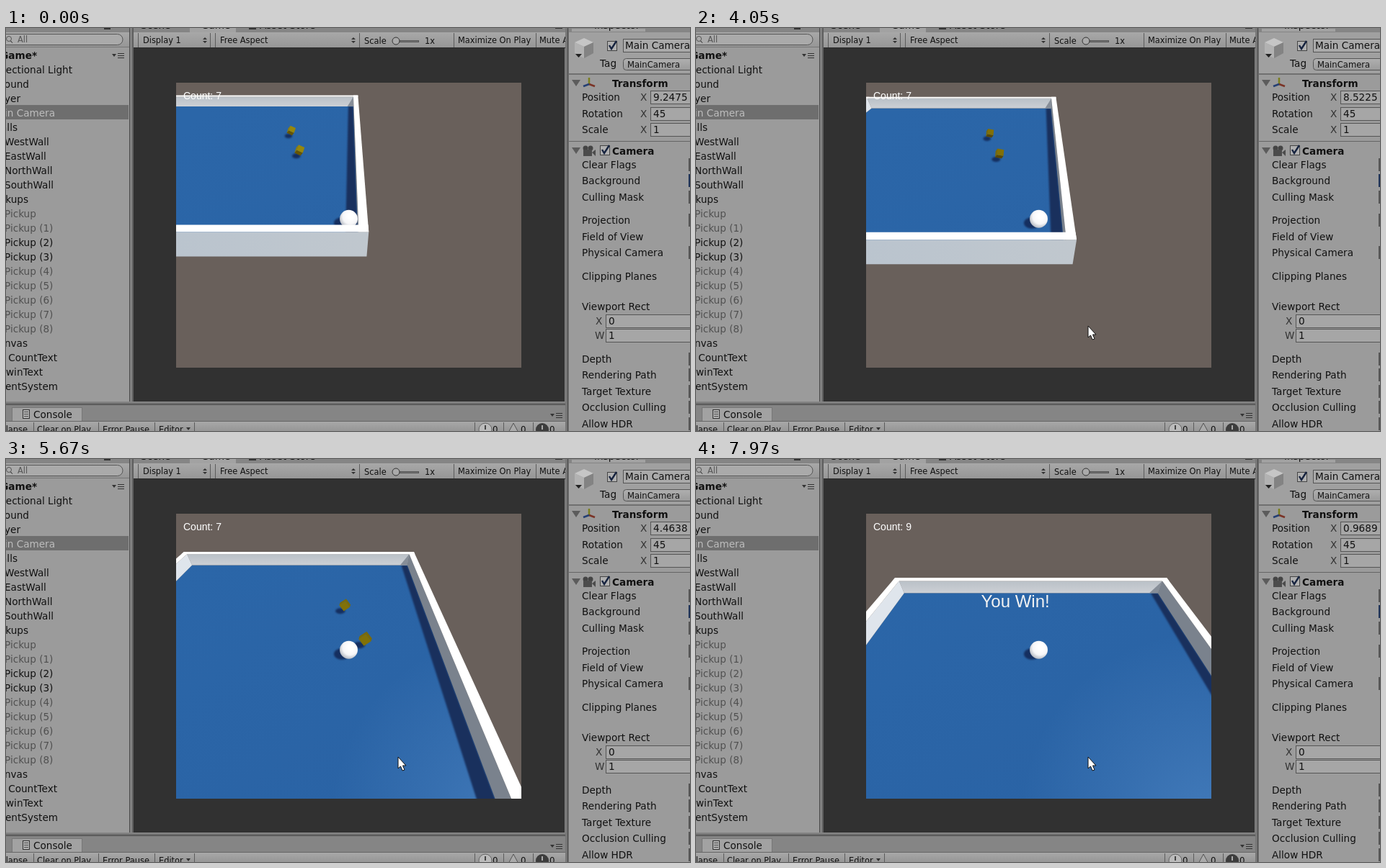
These frames come from a looping animation (949 px wide and 560 px high, 8 s). An HTML page with a canvas:

```html
<!DOCTYPE html>
<html>
<head>
<meta charset="utf-8">
<style>
html, body { margin: 0; width: 100%; height: 100%; overflow: hidden; background: #9b9b9b; }
canvas { display: block; }
</style>
</head>
<body>
<canvas id="stage" width="949" height="560"></canvas>
<script>
const ctx = document.getElementById('stage').getContext('2d');
const UI = '"DejaVu Sans", sans-serif', ARIAL = '"Liberation Sans", Arial, sans-serif';
const LOOP = 8, FIRST_PICK = 5.82, SECOND_PICK = 6.81;

// Motion keys: [seconds, value, speed]
const ballX = [[0, 9.2475, 0], [1.89, 9.2463, 0], [3.25, 9.246, 0], [4.05, 8.41, -2],
  [5.05, 4.683, -2.5], [5.67, 4.44, .3], [6.82, 4.728, -1.6], [7.97, .598, -4.5], [8, .46, -4.5]];
const shownX = [[0, 9.2475, 0], [1.89, 9.2463, 0], [3.3, 9.246, 0], [4.05, 8.5245, -2],
  [5.05, 4.9315, -2.8], [5.67, 4.4638, 0], [6.82, 4.8975, -1.5], [7.97, .9734, -4.5], [8, .84, -4.5]];
const cameraZ = [[0, -18.77, .13], [1.89, -18.53, .13], [3.7, -18.34, .1], [4.05, -18.25, .6],
  [4.21, -18.02, 2], [5.05, -14.58, 4.7], [5.67, -11.93, 3.9], [6.82, -7.95, 2], [7.97, -7.135, .1], [8, -7.13, .1]];

function track(keys, t) {
  let i = 0;
  while (i < keys.length - 2 && t >= keys[i + 1][0]) i++;
  const [t0, a, va] = keys[i], [t1, b, vb] = keys[i + 1];
  const d = t1 - t0, u = (t - t0) / d, w = 1 - u;
  return a * w * w * (1 + 2 * u) + b * u * u * (3 - 2 * u) + d * u * w * (va * w - vb * u);
}

function rect(x, y, w, h, fill, stroke) {
  ctx.fillStyle = fill;
  ctx.fillRect(x, y, w, h);
  if (stroke) {
    ctx.strokeStyle = stroke;
    ctx.lineWidth = 1;
    ctx.strokeRect(x + .5, y + .5, w - 1, h - 1);
  }
}
function text(s, x, y, { size = 13.6, color = '#111', bold, align = 'left', font = UI } = {}) {
  ctx.font = `${bold ? 'bold ' : ''}${size}px ${font}`;
  ctx.fillStyle = color;
  ctx.textAlign = align;
  ctx.fillText(s, x, y);
}
function poly(points, fill, stroke) {
  ctx.beginPath();
  points.forEach(p => ctx.lineTo(p[0], p[1]));
  ctx.closePath();
  ctx.fillStyle = fill;
  ctx.fill();
  if (stroke) { ctx.strokeStyle = stroke; ctx.lineWidth = 1; ctx.stroke(); }
}
function ellipse(x, y, rx, ry, fill, stroke) {
  ctx.beginPath();
  ctx.ellipse(x, y, rx, ry, 0, 0, 7);
  ctx.fillStyle = fill;
  ctx.fill();
  if (stroke) { ctx.strokeStyle = stroke; ctx.lineWidth = 1; ctx.stroke(); }
}
function gradient(x0, y0, x1, y1, from, to) {
  const g = ctx.createLinearGradient(x0, y0, x1, y1);
  g.addColorStop(0, from);
  g.addColorStop(1, to);
  return g;
}
const bar = (x, y, w, h) => rect(x, y, w, h, gradient(0, y, 0, y + h, '#a8a8a8', '#969696'));

// ---------- 3D view: camera 10 up, pitched 45 degrees, 60 degree lens ----------
let cam;
function project(x, y, z) {
  const dy = y - 10, dz = z - cam.z, scale = 343 / ((dz - dy) * Math.SQRT1_2);
  return [475.5 + (x - cam.x) * scale, 274 - (dz + dy) * Math.SQRT1_2 * scale, scale];
}
const face = (fill, ...corners) => poly(corners.map(c => project(...c)), fill);
const flat = (fill, y, x0, x1, z0, z1) => face(fill, [x0, y, z0], [x1, y, z0], [x1, y, z1], [x0, y, z1]);

function shadow(x, z, rx, ry) {
  const [sx, sy, s] = project(x, 0, z);
  ctx.filter = 'blur(1px)';
  ellipse(sx, sy, rx * s, ry * s, 'rgba(18,38,84,.85)');
  ctx.filter = 'none';
}

function cube(x, z, t) {
  shadow(x - .33, z, .34, .2);
  const [cx, cy, s] = project(x, .5, z), half = s * .26;
  const phase = (t - 1.89) / 3.16, turn = phase * 2 * Math.PI;
  const yaw = .15 - .15 * Math.cos(turn / 2), pitch = .6 * Math.sin(turn / 2) ** 2, roll = turn * .75;
  const light = .5 + .5 * Math.max(0, Math.cos(turn)) ** 4 + .2 * Math.max(0, -Math.cos(turn)) ** 4;
  const spin = (a, b, r) => [a * Math.cos(r) - b * Math.sin(r), a * Math.sin(r) + b * Math.cos(r)];
  const rotate = ([px, py, pz]) => {
    [px, pz] = spin(px, pz, yaw);
    [py, pz] = spin(py, pz, -pitch);
    [px, py] = spin(px, py, roll);
    return [px, py, pz];
  };
  for (let axis = 0; axis < 3; axis++) for (const side of [-1, 1]) {
    const normal = [0, 0, 0];
    normal[axis] = side;
    const n = rotate(normal);
    if (n[2] <= .02) continue;
    const b = Math.min(1, light * (n[2] > .7 ? 1 : n[1] < 0 ? .95 : .68));
    const corners = [[-1, -1], [1, -1], [1, 1], [-1, 1]].map(([u, v]) => {
      const p = [0, 0, 0];
      p[axis] = side; p[(axis + 1) % 3] = u; p[(axis + 2) % 3] = v;
      const r = rotate(p);
      return [cx + r[0] * half, cy + r[1] * half];
    });
    poly(corners, `rgb(${255 * b},${255 * b ** 1.2},${60 * b ** 3})`);
  }
}

function game(t) {
  rect(177, 28, 598, 491, '#313131');
  ctx.save();
  ctx.beginPath();
  ctx.rect(236, 76, 479, 396);
  ctx.clip();
  rect(236, 76, 479, 396, '#69605b');
  cam = { x: track(ballX, t), z: track(cameraZ, t) };
  const ballZ = cam.z + 10, I = 9.75, O = 10.25;

  flat(gradient(300, 100, 560, 480, '#2b66a8', '#2a63a5'), 0, -I, I, -I, I);
  const sheen = ctx.createRadialGradient(710, 500, 0, 710, 500, 260);
  sheen.addColorStop(0, 'rgba(100,155,215,.4)');
  sheen.addColorStop(1, 'rgba(100,155,215,0)');
  flat(sheen, 0, -I, I, -I, I);
  ctx.filter = 'blur(1px)';
  face('#19305d', [9.07, 0, -I], [I, 0, -I], [I, 0, I], [9.2, 0, I]);
  ctx.filter = 'none';

  const top = project(0, 1, I)[1], foot = project(0, 0, I)[1];
  face(gradient(0, top, 0, foot, '#b9c0c7', '#cdd0d5'), [-I, 1, I], [I, 1, I], [I, 0, I], [-I, 0, I]);
  face('#878e98', [9.1, 0, I], [I, 1, I], [I, 0, I]);
  face('#dfe5ec', [-I, 1, I], [-I, 0, I], [-I, 0, -I], [-I, 1, -I]);
  face('#7a828d', [I, 1, I], [I, 0, I], [I, 0, -I], [I, 1, -I]);
  flat('#fff', 1, -O, O, I, O);
  flat('#fff', 1, -O, -I, -O, O);
  flat('#fff', 1, I, O, -O, O);

  if (t < SECOND_PICK) cube(4.18, 2.55, t);
  if (t < FIRST_PICK) cube(5.41, -.98, t);

  shadow(cam.x - .4, ballZ + .18, .46, .32);
  const [bx, by, s] = project(cam.x, .5, ballZ);
  const shine = ctx.createRadialGradient(bx + 3, by - 4, 4, bx + 2, by - 3, 16);
  shine.addColorStop(0, '#fff');
  shine.addColorStop(.55, '#f6f6f8');
  shine.addColorStop(1, '#b4b9c2');
  ellipse(bx, by, s / 2, s / 2, shine);

  flat('#fff', 1, -O, O, -O, -I);
  face(gradient(236, 0, 650, 0, '#bac4ce', '#c3c9ce'), [-O, 1, -O], [O, 1, -O], [O, -1, -O], [-O, -1, -O]);

  const count = t < FIRST_PICK ? 7 : t < SECOND_PICK ? 8 : 9;
  text('Count: ' + count, 246, 99, { size: 14, color: '#fff', font: ARIAL });
  if (count === 9) text('You Win!', 395.5, 206, { size: 24, color: '#f2f2f2', font: ARIAL });
  ctx.restore();
}

// ---------- Editor panels ----------
function menuIcon(x, y) {
  poly([[x, y - 2], [x + 6, y - 2], [x + 3, y + 2]], '#333');
  for (let i = 0; i < 3; i++) rect(x + 8, y - 3 + i * 3, 9, 1, '#333');
}
function updown(x, y) {
  poly([[x, y - 1], [x + 6, y - 1], [x + 3, y - 4]], '#333');
  poly([[x, y + 1], [x + 6, y + 1], [x + 3, y + 4]], '#333');
}
function checkbox(x, y) {
  rect(x, y, 14, 14, '#b0b0b0', '#444');
  ctx.strokeStyle = '#16233f';
  ctx.lineWidth = 2.4;
  ctx.beginPath();
  ctx.moveTo(x + 3, y + 6);
  ctx.lineTo(x + 6, y + 11);
  ctx.lineTo(x + 13, y);
  ctx.stroke();
}
const fold = (x, y) => poly([[x, y], [x + 12, y], [x + 6, y + 9]], '#5c5c5c');

// Label and the x where it ends; without one it is an indented child.
const rows = [['Directional Light', 92], ['Ground', 32], ['Player', 20], ['Main Camera', 68], ['Walls', 16],
  ['WestWall'], ['EastWall'], ['NorthWall'], ['SouthWall'], ['Pickups', 31], ['Pickup'],
  ...Array.from({ length: 8 }, (_, i) => [`Pickup (${i + 1})`]),
  ['Canvas', 30], ['CountText', 71], ['winText', 51], ['EventSystem', 72]];

function hierarchy(t) {
  rect(0, 0, 171, 521, '#9b9b9b');
  rect(0, 0, 171, 6, '#858585');
  rect(136, 0, 9, 2, '#333');
  bar(0, 6, 171, 20);
  ctx.beginPath();
  ctx.roundRect(-12, 8.5, 174, 15, 8);
  ctx.fillStyle = '#aaa';
  ctx.fill();
  ctx.strokeStyle = '#555';
  ctx.lineWidth = 1;
  ctx.stroke();
  ellipse(4, 15, 3.5, 3.5, '#aaa', '#555');
  poly([[6, 18], [9, 21], [7, 18]], '#555', '#555');
  text('All', 16, 20, { size: 11.4, color: '#555' });
  rect(0, 26, 171, 1, '#777');
  text('Game*', 43, 43, { bold: true, align: 'right' });
  menuIcon(147, 38);
  rect(0, 107, 170, 20, '#6e6e6e');
  rows.forEach(([label, end], i) => {
    const gone = label.startsWith('Pickup') && label !== 'Pickups' &&
      !(label === 'Pickup (2)' && t < SECOND_PICK) && !(label === 'Pickup (3)' && t < 5.96);
    const color = i === 3 ? '#bdbdbd' : gone ? '#505050' : '#111';
    text(label, end ?? -2, 63 + i * 20, { color, align: end ? 'right' : 'left' });
  });
  rect(171, 0, 1, 521, '#4a4a4a');
}

function gameToolbar() {
  rect(175, 0, 602, 6, '#858585');
  rect(255, 0, 64, 6, '#a2a2a2');
  text('Scene', 187, 1);
  text('Game', 271, 1);
  text('Asset Store', 352, 1);
  rect(337, 0, 10, 2, '#333');
  rect(762, 0, 10, 1, '#333');
  bar(177, 6, 599, 21);
  rect(177, 27, 599, 1, '#2a2a2a');
  rect(175, 0, 2, 521, '#5e5e5e');
  for (const x of [183, 283, 290, 490, 621, 735]) rect(x, 7, 1, 20, '#5c5c5c');
  const small = { size: 11.4 };
  text('Display 1', 190, 21, small);
  text('Free Aspect', 297, 21, small);
  text('Scale', 497, 22, small);
  text('1x', 581, 22, small);
  text('Maximize On Play', 627, 21, small);
  text('Mute A', 740, 21, small);
  updown(273, 17);
  updown(479, 17);
  rect(541, 17, 32, 3, '#777', '#555');
  ellipse(541, 18, 5, 5, '#aaa', '#333');
}

function consolePanel() {
  rect(0, 519, 778, 41, '#858585');
  rect(0, 521, 778, 2, '#6a6a6a');
  rect(0, 523, 778, 1, '#505050');
  rect(8, 527, 98, 20, '#a2a2a2', '#777');
  rect(23, 530, 10, 13, '#b5b5b5', '#333');
  for (const y of [533, 536, 539]) rect(25, y, 6, 1, '#444');
  text('Console', 38, 542);
  menuIcon(755, 538);
  bar(0, 547, 776, 13);
  rect(0, 546, 776, 1, '#666');
  for (const x of [38, 128, 206, 261, 650, 690, 731]) rect(x, 548, 1, 12, '#5c5c5c');
  const small = { size: 11.4 };
  text('Collapse', 30, 562, { ...small, align: 'right' });
  text('Clear on Play', 43, 562, small);
  text('Error Pause', 134, 562, small);
  text('Editor', 212, 562, small);
  poly([[250, 555], [256, 555], [253, 559]], '#333');
  ellipse(665, 558, 9, 9, '#bbb', '#666');
  rect(664, 552, 2, 6, '#444');
  poly([[704, 549], [712, 564], [696, 564]], '#aaa', '#555');
  ellipse(744, 558, 9, 9, '#3c3c3c');
  rect(743, 552, 2, 6, '#aaa');
  for (const x of [675, 714, 754]) text('0', x, 562, { size: 11.8 });
}

const field = (x, y, value) => {
  rect(x, y, 70, 19, '#a6a6a6', '#555');
  text(value, x + 4, y + 14);
};

const settings = [['Clear Flags', 195], ['Background', 217], ['Culling Mask', 240], ['Projection', 272],
  ['Field of View', 295], ['Physical Camera', 317], ['Clipping Planes', 350], ['Viewport Rect', 392],
  ['Depth', 465], ['Rendering Path', 487], ['Target Texture', 510], ['Occlusion Culling', 532], ['Allow HDR', 555]];

function inspector(t) {
  rect(776, 0, 5, 560, '#777');
  rect(779, 0, 1, 560, '#484848');
  rect(781, 0, 168, 560, '#9b9b9b');
  rect(781, 0, 168, 6, '#858585');
  rect(784, 0, 104, 6, '#a2a2a2', '#858585');
  text('Inspector', 816, 1);
  rect(781, 6, 168, 57, '#a0a0a0');
  poly([[802, 14], [815, 20], [802, 26], [789, 20]], '#c6c6c6');
  poly([[789, 20], [802, 26], [802, 42], [789, 35]], '#b2b2b2');
  poly([[815, 20], [802, 26], [802, 42], [815, 35]], '#838383');
  poly([[790, 36], [799, 36], [794.5, 41]], '#222');
  checkbox(834, 18);
  rect(856, 15, 100, 19, '#aaa', '#555');
  text('Main Camera', 859, 29);
  text('Tag', 824, 54);
  ctx.beginPath();
  ctx.roundRect(856.5, 42.5, 110, 16, 4);
  ctx.fillStyle = gradient(0, 42, 0, 59, '#b0b0b0', '#999');
  ctx.fill();
  ctx.strokeStyle = '#555';
  ctx.lineWidth = 1;
  ctx.stroke();
  text('MainCamera', 862, 55, { size: 11.6 });

  rect(781, 63, 168, 2, '#707070');
  fold(785, 72);
  for (const [x, y, c] of [[809, 69, '#7b801f'], [817, 81, '#7a3326'], [801, 81, '#243f73']]) {
    ctx.strokeStyle = c;
    ctx.lineWidth = 2.5;
    ctx.beginPath();
    ctx.moveTo(809, 78);
    ctx.lineTo(x, y);
    ctx.stroke();
  }
  text('Transform', 841, 82, { bold: true });
  [['Position', track(shownX, t).toFixed(4), 101], ['Rotation', '45', 124], ['Scale', '1', 146]].forEach(([label, value, y]) => {
    text(label, 799, y);
    text('X', 880, y, { color: '#333' });
    field(894, y - 14, value);
  });

  rect(781, 157, 168, 1, '#666');
  fold(785, 166);
  ellipse(804, 167, 3.5, 3.5, '#444');
  ellipse(811, 167, 3.5, 3.5, '#444');
  rect(801, 169, 12, 9, '#4c4c4c');
  poly([[813, 173], [818, 169], [818, 178]], '#4c4c4c');
  checkbox(824, 163);
  text('Camera', 841, 176, { bold: true });
  settings.forEach(([label, y]) => {
    text(label, 799, y);
    if (!/View|Planes/.test(label)) rect(947, y - 14, 2, 18, label === 'Background' ? '#1f3358' : '#555');
  });
  text('X', 818, 412, { color: '#333' });
  text('W', 817, 432, { color: '#333' });
  for (const [y, v] of [[398, '0'], [418, '1']]) {
    rect(832, y, 130, 19, '#a6a6a6', '#555');
    text(v, 836, y + 14);
  }
}

function cursor(t) {
  if (t < 2.1) return;
  const left = (1 - Math.min(1, (t - 2.1) / .38)) ** 2;
  const x = 544 + 230 * left, y = 414 + 110 * left;
  const shape = [[0, 0], [0, 16], [3.5, 13], [6, 19], [9, 18], [6.5, 12], [11, 12]];
  poly(shape.map(p => [x + p[0], y + p[1]]), '#fff', '#111');
}

function draw(now) {
  const t = now / 1000 % LOOP;
  rect(0, 0, 949, 560, '#828282');
  hierarchy(t);
  gameToolbar();
  game(t);
  consolePanel();
  inspector(t);
  cursor(t);
  requestAnimationFrame(() => draw(performance.now() - start));
}
const start = performance.now();
draw(0);
</script>
</body>
</html>
```
